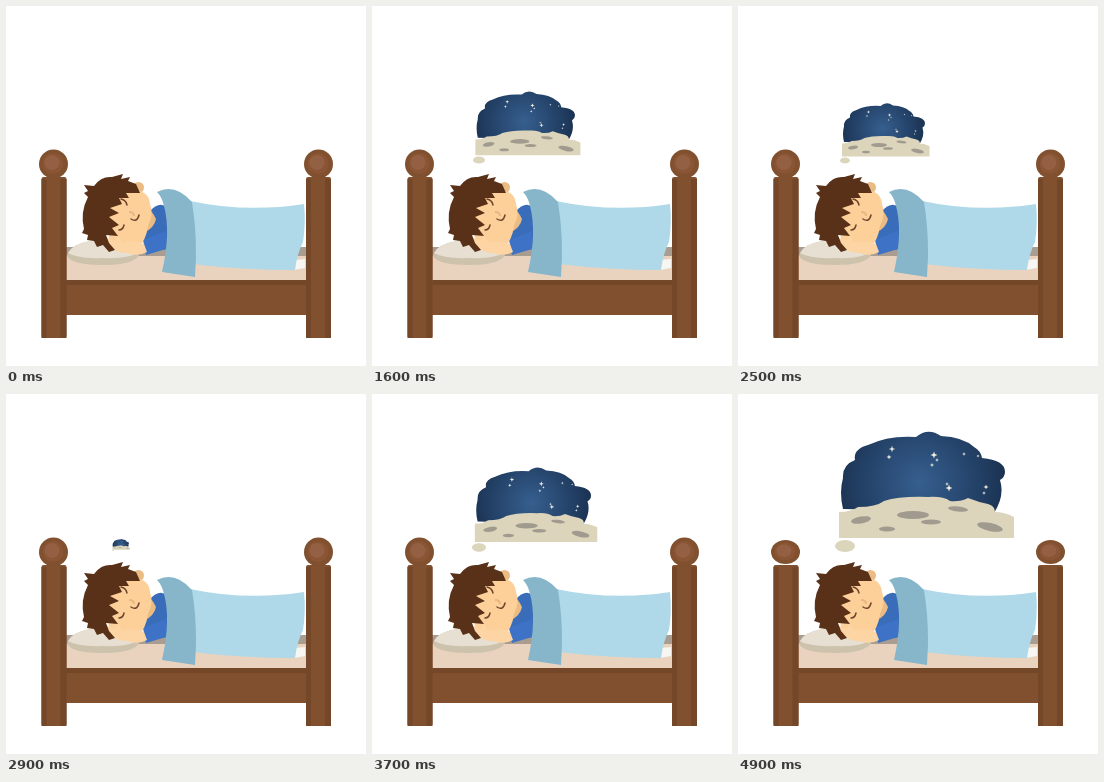
These frames come from a looping animation (360 by 360 pixels, 5000 ms). An HTML page:

```html
<!DOCTYPE html>
<html lang="en">
<head>
<meta charset="utf-8">
<title>Dreaming</title>
<style>
html, body { margin: 0; height: 100%; overflow: hidden; background: #fff; }
svg { display: block; width: 100vw; height: 100vh; }
.line { fill: none; stroke: #70452d; stroke-width: 1.5; stroke-linecap: round; }
</style>
</head>
<body>
<svg viewBox="0 0 360 360">
  <defs>
    <radialGradient id="night" gradientUnits="userSpaceOnUse" cx="182" cy="88" r="84">
      <stop offset="0" stop-color="#365f8f"/>
      <stop offset=".55" stop-color="#27476f"/>
      <stop offset="1" stop-color="#1b3353"/>
    </radialGradient>
    <g id="knob">
      <circle r="14.5" fill="#80502f"/>
      <circle r="10.5" cx="-.5" cy="-.5" fill="#895535"/>
      <circle r="7.5" cx="-1.5" cy="-1.5" fill="#946043"/>
    </g>
    <g id="post">
      <rect width="25" height="161" rx="2" fill="#80502f"/>
      <path d="M0 2H5V161H0ZM19 2H25V161H19Z" fill="#754729"/>
    </g>
    <path id="star" d="M0-3.2L.8-.8 3.2 0 .8.8 0 3.2-.8.8-3.2 0-.8-.8Z" fill="#f4f1e4"/>
  </defs>

  <!-- bed -->
  <rect x="60" y="241" width="240" height="11" fill="#a89d90"/>
  <rect x="60" y="250" width="240" height="25" fill="#e9d3bf"/>
  <rect x="60" y="274" width="240" height="35" fill="#80502f"/>
  <rect x="60" y="274" width="240" height="5" fill="#754729"/>
  <use href="#post" x="35.5" y="171"/>
  <use href="#post" x="300" y="171"/>
  <g class="knob"><use href="#knob"/></g>
  <g class="knob"><use href="#knob"/></g>

  <!-- pillow -->
  <path d="M61 250Q63 240 80 236Q97 231 114 236Q133 241 133 249Q128 259 97 259Q66 259 61 250Z" fill="#cdc2ac"/>
  <path d="M62 247Q66 239 80 236Q97 231 114 236Q130 240 132 246Q124 253 97 252Q72 253 62 247Z" fill="#e7dfd2"/>

  <!-- boy -->
  <path d="M143 206Q154 194 161 202V243L144 246Q137 240 138 230Z" fill="#396cb9"/>
  <path id="sleeve" d="M137 234L160 225V243L140 249Z" fill="#3e72c6"/>
  <path d="M139 201Q146 204 150 213Q148 222 139 226Z" fill="#eabb82"/>
  <circle cx="132.500" cy="181.500" r="5.500" fill="#eabb82"/>
  <path d="M101 198Q110 183 128 184Q143 185 144 198Q148 208 142 220Q140 235 132 241Q118 249 103 237Z" fill="#fdd09a"/>
  <path id="hand" d="M99 231L108 235L112 230L116 237Q128 233 138 238L141 246Q132 251 121 247Q105 247 99 231Z" fill="#fdd5a5"/>
  <path d="M130 178L122 175L124 171L115 173L117 168L106 171Q95 170 88 180L78 179L82 185L78 187L82 191Q74 206 78 223L76 227L82 229L81 234L88 235L91 241L97 239L103 246L109 244L103 237L100 229L112 230L106 222L113 219L103 211L113 207L104 202L116 198L113 192L123 192L120 187L134 187Z" fill="#593118"/>
  <path class="line" d="M115 193Q120 194 121 199M113 224Q117 224 118 219M125 213Q131 217 133 209"/>
  <path id="brow" class="line" d="M115 192Q121 191 123 197" stroke-width="2"/>
  <path d="M123 206Q128 206 128 210" fill="none" stroke="#e9b77f" stroke-width="2"/>

  <!-- blanket -->
  <path d="M289 254L299 253V262L288 264Z" fill="#f7f6f2"/>
  <path d="M184 195Q240 207 298 198Q300 217 297 236Q291 248 289 264Q236 264 186 258Z" fill="#afd9e8"/>
  <path d="M151 186Q169 177 186 196Q192 233 189 271L156 266Q165 226 158 200Q156 191 151 186Z" fill="#87b6ca"/>

  <!-- dream -->
  <g id="dream">
    <ellipse cx="107" cy="152" rx="10" ry="6" fill="#dbd5bc"/>
    <path d="M105 115Q101 98 105 84Q104 71 117 66Q115 55 130 51Q151 41 178 43Q190 33 203 42Q225 43 236 53Q243 57 244 64Q267 66 267 78Q267 83 262 86Q267 102 256 119Z" fill="url(#night)"/>
    <path d="M101 144V118Q113 118 120 113Q138 113 146 107Q162 102 190 103Q205 102 212 107Q222 108 230 104Q240 108 250 110Q257 112 257 118Q266 118 276 123V144Z" fill="#dcd5bb"/>
    <g id="craters" fill="#a09b8e"></g>
    <g id="stars"></g>
  </g>
</svg>
<script>
const $ = id => document.getElementById(id);

$("craters").innerHTML = [
  [123, 126, 10, 3.5, -10], [175, 121, 16, 4, 0], [149, 135, 8, 2.5, 0],
  [193, 128, 10, 2.5, 0], [252, 133, 13, 4, 12], [220, 115, 10, 2.5, 6]
].map(([x, y, rx, ry, turn]) =>
  `<ellipse rx="${rx}" ry="${ry}" transform="translate(${x} ${y}) rotate(${turn})"/>`
).join("");

$("stars").innerHTML = [
  [154, 55, 1], [151, 63, .8], [196, 61, 1.1], [199, 66, .6], [194, 71, .7],
  [226, 60, .6], [240, 62, .5], [211, 94, 1.1], [209, 90, .6], [248, 93, .8], [246, 99, .6]
].map(([x, y, k]) =>
  `<use href="#star" transform="translate(${x} ${y}) scale(${k})"/>`
).join("");

const LOOP = 5000;
const knobs = [...document.querySelectorAll(".knob")];
const show = (id, on) => $(id).setAttribute("visibility", on ? "visible" : "hidden");

// Nothing for a second, then grow, shrink, grow and hold.
function dreamSize(t) {
  if (t < 1000) return 0;
  return t < 4000 ? 1 - Math.abs(t % 2000 - 2000 * (t % 2000 >= 1000)) / 1000 : 1;
}

function draw(now) {
  const t = Math.floor(now % LOOP / 100) * 100;
  const size = dreamSize(t);
  $("dream").setAttribute("transform",
    `translate(107 157) scale(${size}) translate(-107 -157)`);
  show("dream", size > 0);

  const deep = size > .85 && t < 4500;
  show("brow", deep);
  show("hand", !deep);
  show("sleeve", !deep);

  const flat = t >= 4000 ? .83 : 1;
  knobs.forEach((k, i) =>
    k.setAttribute("transform", `translate(${i ? 312.5 : 47.5} 158) scale(1 ${flat})`));
  requestAnimationFrame(draw);
}
draw(performance.now());
</script>
</body>
</html>
```
